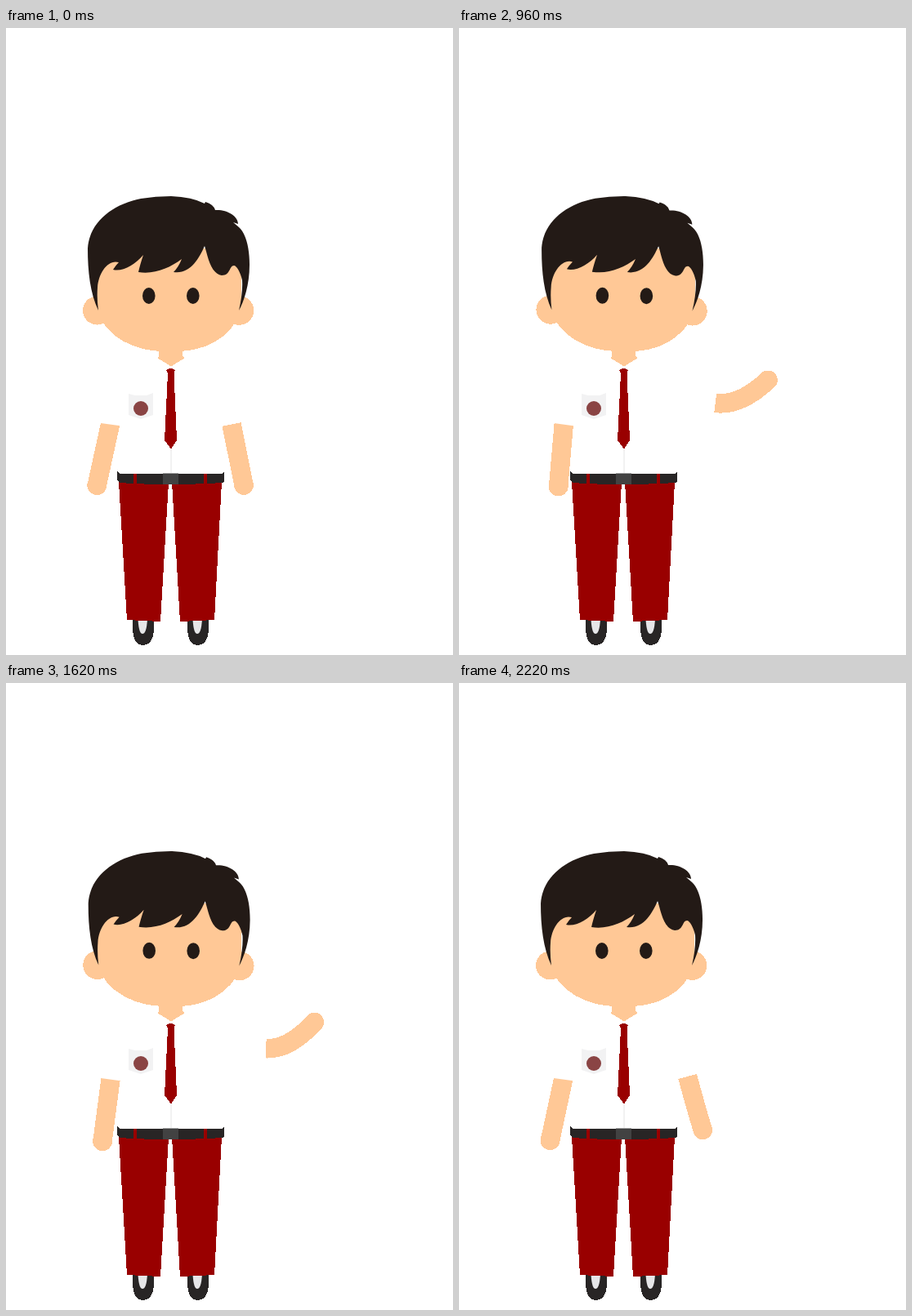
Write an HTML page that moves like this. It is 547x768 px and loops after 2250 ms.

```html
<!DOCTYPE html>
<html lang="en">
<head>
<meta charset="utf-8">
<title>Schoolboy</title>
<style>
  html, body { margin: 0; width: 100%; height: 100%; overflow: hidden; background: #fff; }
  svg { display: block; width: 100%; height: 100%; }
  .skin { fill: #ffc896; }
  .limb { fill: none; stroke: #ffc896; stroke-width: 23.4; }
  .hair { fill: #231a16; }
  .red { fill: #990000; }
  .dark { fill: #282525; }
  .tongue { fill: #e6e6e8; }
  .skin, .limb, .red, .dark { shape-rendering: crispEdges; }
</style>
</head>
<body>
<svg viewBox="0 0 547 768">
  <!-- legs -->
  <g id="shoe">
    <path class="dark" d="M155 724H181V738C180 750 176 756 167 756C159 756 156 749 155 738Z"/>
    <path class="tongue" d="M161.500 724H173Q172 742 167 742Q162.500 742 161.500 724Z"/>
  </g>
  <use href="#shoe" x="67"/>
  <path class="red" d="M138 556H199L189 727L148 725Z M203 556H264L255 725L213 727Z"/>

  <!-- arms -->
  <g id="leftArm">
    <path class="limb" d="M130.500 472L111.300 560"/>
    <circle class="skin" cx="111.300" cy="560" r="12"/>
  </g>
  <path fill="#fff" d="M95 455L116 484L138 487L155 489V455Z"/>
  <path class="limb" id="rightArm"/>
  <circle class="skin" id="hand" r="11.8"/>

  <!-- shirt, belt and tie -->
  <path class="skin" d="M187 390H216V402L219 404L202 414.500L185 404L187 402Z"/>
  <path fill="#f2f2f3" d="M150 448L158 450H172L180 447V474L165 479L150 474Z"/>
  <circle cx="165" cy="466" r="9" fill="#8a4444"/>
  <path stroke="#e4e4e4" d="M202 513V545"/>
  <path class="dark" d="M136 543L139 546H264L267 543V556L264 557Q234 559 202 559Q168 559 139 557L136 554Z"/>
  <path class="red" d="M156 546H160V558H156Z M242 546H246V558H242Z"/>
  <path fill="#424242" d="M192 545.5H211V559H192Z"/>
  <path class="red" d="M196 419Q201 415 207 419L205.500 423L209 505L202 515.500L194 505L198 423Z"/>

  <!-- head -->
  <g id="head">
    <circle class="skin" cx="111.500" cy="346" r="17.500"/>
    <circle class="skin" cx="285.500" cy="346" r="17.800"/>
    <path class="skin" d="M111 320V345C122 380 160 396 192 396H210C242 396 277 380 288 345V270H111Z"/>
    <path class="hair" d="M113 346C103 325 100 298 100 270C102 238 130 216 165 209Q183 206 202 206
      Q228 207 243 215L244 213Q254 216 256 223C270 222 284 230 284 240L278 238L285 244
      C293 251 298 268 298 290C298 315 291 335 285 346Q290 324 289 309C287 299 282 291 279 291
      C273 291 275 303 264 303C250 301 247 279 243 267C236 283 225 302 205 299Q211 293 215 283
      C200 294 182 302 162 299Q164 290 168 278C158 290 142 299 131 296Q134 291 138 287
      C125 283 113 300 112 318Q111 331 113 346Z"/>
    <ellipse class="hair" cx="174.800" cy="328" rx="7.800" ry="10"/>
    <ellipse class="hair" cx="228.800" cy="328" rx="7.800" ry="10"/>
  </g>
</svg>
<script>
  const LOOP = 2250, STEP = 30;
  const el = id => document.getElementById(id);

  // the waving arm moves evenly between these poses and back to the first
  const poses = [
    { at: 0, sleeve: [276, 485.5], elbow: [283.5, 523], hand: [291, 560] },
    { at: 390, sleeve: [289, 487.5], elbow: [301, 514], hand: [329, 523.5] },
    { at: 690, sleeve: [299, 488], elbow: [330, 505], hand: [360.5, 468.5] },
    { at: 930, sleeve: [313.5, 460], elbow: [344, 464], hand: [378, 432] },
    { at: 1890, sleeve: [320, 443], elbow: [348, 443], hand: [377, 409] }
  ];
  poses.push({ ...poses[0], at: LOOP });

  function drawRightArm(t) {
    const next = poses.findIndex(p => p.at > t);
    const a = poses[next - 1], b = poses[next];
    const u = (t - a.at) / (b.at - a.at);
    const mix = part => a[part].map((v, i) => v + (b[part][i] - v) * u);
    const hand = mix('hand');
    el('rightArm').setAttribute('d', `M${mix('sleeve')}Q${mix('elbow')} ${hand}`);
    el('hand').setAttribute('cx', hand[0]);
    el('hand').setAttribute('cy', hand[1]);
  }

  function draw(now) {
    const t = Math.floor(now % LOOP / STEP) * STEP;
    const sway = 1 - Math.abs(2 * t / LOOP - 1);
    drawRightArm(t);
    el('leftArm').setAttribute('transform', `rotate(${-8.6 * sway} 128 480)`);
    el('head').setAttribute('transform', `rotate(${0.6 * sway} 202 395)`);
    requestAnimationFrame(draw);
  }
  requestAnimationFrame(draw);
</script>
</body>
</html>
```
